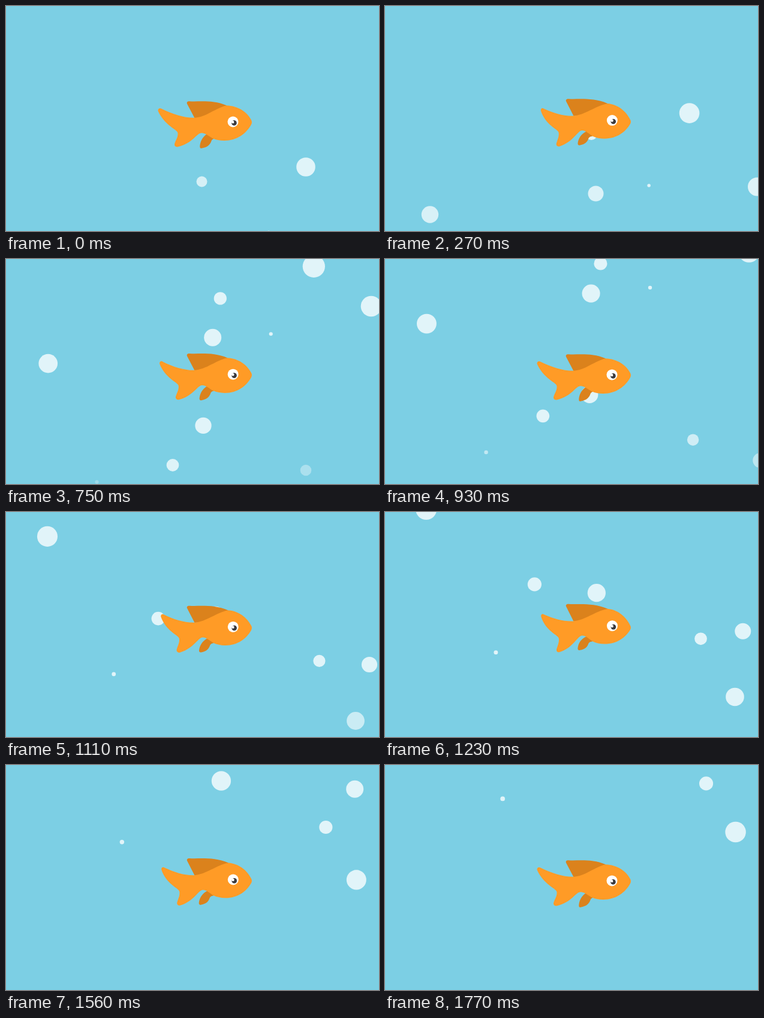
An HTML page with a canvas for the animation above (1.8 s loop, 622 by 376 pixels).

```html
<!DOCTYPE html>
<html lang="en">
<head>
<meta charset="utf-8">
<title>Goldfish</title>
<style>
  html, body { margin: 0; width: 100%; height: 100%; overflow: hidden; background: #7ccfe4; }
  canvas { display: block; width: 622px; height: 376px; }
</style>
</head>
<body>
<canvas id="stage" width="622" height="376"></canvas>
<script>
const ctx = document.getElementById('stage').getContext('2d');
const LOOP = 1800, SWIM = 900, STEP = 30;

// time (s), x, sideways drift, y, rise speed, acceleration, radius, opacity
const bubbles = [
  [0, 500, 16, 269, 328, 19, 15.8, .76],
  [0, 326.5, 37, 293.5, 287, 22, 9, .68],
  [.27, 351.5, -10, 313.5, 358, 45, 13, .73],
  [0, 438, 4.5, 378, 262, 100, 2.6, .74],
  [.27, 75, -7, 348.5, 357, 11, 14.2, .7],
  [.27, 620.5, -17, 302, 435, 62, 15.5, .75],
  [.51, 302, 62, 343.5, 262, 38, 12.9, .45],
  [.75, 278, -42, 344.5, 451, 31, 10.4, .74],
  [.75, 151.5, 49, 372.5, 267, 42, 3.1, .26],
  [.75, 500, 39, 353, 275, 40, 9.3, .36],
  [1.11, 606, -37, 255, 460, 38, 13.1, .76],
  [1.11, 583, 2, 349, 328, 47, 14.9, .6]
];

// Each part has a low and a high pose with matching points.
const pelvic = [
  'M335 214C327 219 323.5 228 323.3 235C323.3 237.5 325 238.2 327 237.6C336 236 340.5 231.5 342.5 225.5C344 222 347 222 348 221L345 213Z',
  'M336 206.5C327 210 322.5 217 321.6 226C321.6 229 323 229.8 325.5 229.2C334 227.8 337.5 224.5 339.5 219C341 215.5 344.5 215.5 347.5 214.5L345 206Z'
];
const dorsal = [
  'M302 163.5C300.8 160.5 303 159 306 159.2C320 160.6 344 156 368 166.3L366 172L340 185L314.5 187.3Z',
  'M302 156.5C301 154 303 152.3 306 152.5C320 153.8 346 149.5 371 160.8L369 167L340 180L314.5 181.5Z'
];
const body = [
  'M253.6 175.5C252.8 171.5 256.5 169.5 260 172C277 180.5 297 187 314 186.8C334 186 350 170 368 166.3' +
  'C387 167 402 177 409 190.5C410.3 193 410.3 195.5 409 198C401 213 385 225 364 225' +
  'C356 225 350 223.5 345.5 221.5C339 218.5 333 212.3 326 212.3C318 212.3 312 229 287 235.3' +
  'C282.5 236.3 280 233 281.3 229.5C284 222 287.5 218 286.3 211.5C284.5 206 264 199 253.6 175.5Z',
  'M259.5 174.5C258.8 171 262 169.2 265 171.5C281 178 297 182.2 314 181.5C334 180 350 165 371 160.8' +
  'C388 162.5 402 174.5 409 189.5C410.3 192 410.3 194 409 196.5C401 209 387 219.5 366 219.5' +
  'C358 219.5 352 217.5 347 215.5C341 212 335 205 328.5 205C321 205 314 226 291 233.8' +
  'C287 235 284.5 232 285.7 228.5C288 222 290.5 216 289.3 210.5C287.5 205 267 198 259.5 174.5Z'
];

const number = /[\d.]+/g;

function blend([low, high], kx, ky) {
  const goal = high.match(number);
  let i = 0;
  return low.replace(number, n => {
    const k = i % 2 ? ky : kx;
    return +n + (goal[i++] - n) * k;
  });
}

function disc(x, y, r, color) {
  ctx.fillStyle = color;
  ctx.beginPath();
  ctx.arc(x, y, r, 0, Math.PI * 2);
  ctx.fill();
}

function drawBubble(time, [start, x, drift, y, speed, accel, r, opacity]) {
  const u = time - start;
  const alpha = Math.min(.77, opacity + 1.5 * u);
  if (alpha <= 0) return;
  disc(x + drift * (1 - Math.exp(-u / .42)), y - speed * u - accel * u * u,
    r * (1 + .24 * u), `rgba(255,255,255,${alpha})`);
}

function drawFish(ms) {
  const wave = (1 - Math.cos(ms / SWIM * Math.PI * 2)) / 2;
  const lift = Math.pow(wave, 1.2);
  // The tail swings faster than the body rises.
  const sway = Math.sin(2.05 * lift) / Math.sin(2.05);
  const part = (poses, color) => {
    ctx.fillStyle = color;
    ctx.fill(new Path2D(blend(poses, sway, lift)));
  };
  part(pelvic, '#db821c');
  part(dorsal, '#db821c');
  part(body, '#ff9b26');

  const dx = .6 * lift, dy = -4.1 * lift;
  disc(378.5 + dx, 193.5 + dy, 9, '#fff');
  disc(380.4 + dx, 195.4 + dy, 4.3, '#3a3a3e');
  disc(378.2 + dx, 194 + dy, 2.2, '#fff');
}

const begin = performance.now();

function draw() {
  const ms = Math.floor((performance.now() - begin) % LOOP / STEP) * STEP;
  ctx.fillStyle = '#7ccfe4';
  ctx.fillRect(0, 0, 622, 376);
  bubbles.forEach(b => drawBubble(ms / 1000, b));
  drawFish(ms);
  requestAnimationFrame(draw);
}
draw();
</script>
</body>
</html>
```
